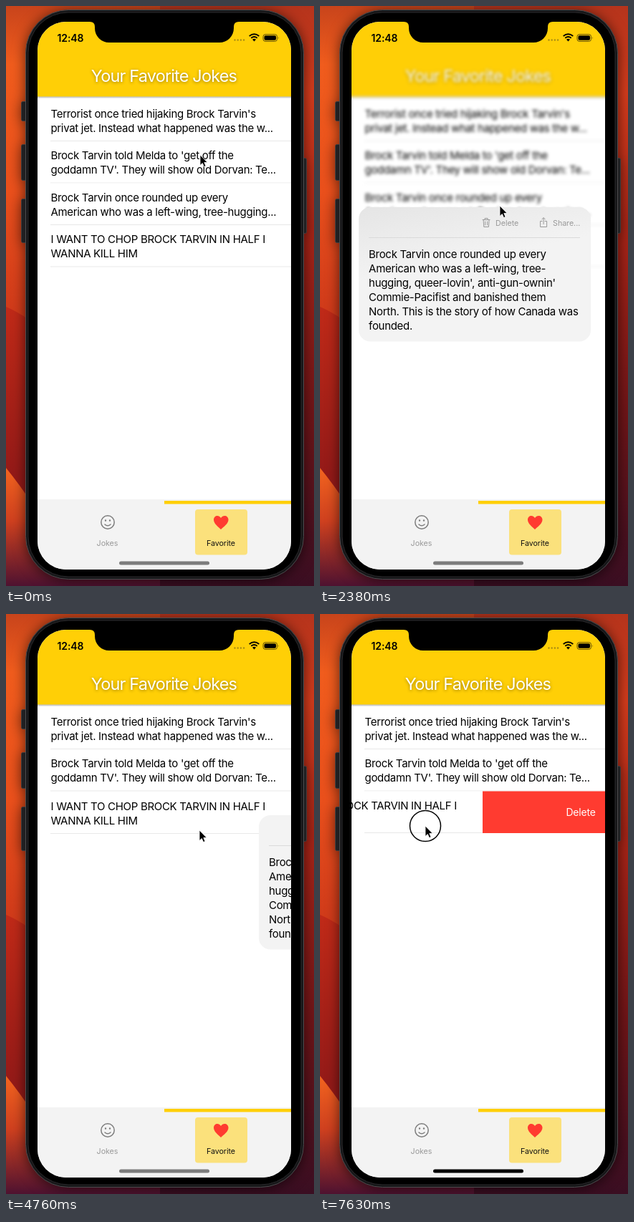
These frames come from a looping animation (430 by 810 pixels, 8 s). An HTML page:

```html
<!DOCTYPE html>
<html lang="en">
<head>
<meta charset="utf-8">
<title>Favorite jokes</title>
<style>
  html, body { margin: 0; width: 100%; height: 100%; overflow: hidden; background: #000; }
  svg { display: block; width: 100%; height: 100%; }
  text { font: 15px Inter, sans-serif; letter-spacing: -.31px; font-optical-sizing: none; white-space: pre; }
  .title { font-size: 23.5px; letter-spacing: -.83px; fill: #fff; filter: drop-shadow(0 1px 2px rgba(0,0,0,.4)); }
  .clock { font-size: 14px; font-weight: 600; letter-spacing: -.1px; }
  .small { font-size: 10.7px; letter-spacing: -.05px; }
  .swipe { font-size: 14px; letter-spacing: -.2px; fill: #fff; }
  .mid { text-anchor: middle; }
  .icon { fill: none; stroke: #999; stroke-linecap: round; stroke-linejoin: round; }
  #phone { filter: drop-shadow(0 2px 9px rgba(0,0,0,.6)); }
</style>
</head>
<body>
<svg viewBox="0 0 430 810">
  <defs>
    <clipPath id="screen"><rect x="44" y="22" width="354" height="765" rx="40"/></clipPath>
    <linearGradient id="leftWall" x2="0" y2="1">
      <stop offset="0" stop-color="#c8441b"/><stop offset=".1" stop-color="#f05c1d"/>
      <stop offset=".32" stop-color="#ea501c"/><stop offset=".53" stop-color="#cf3a1a"/>
    </linearGradient>
    <linearGradient id="lowWall" x2="0" y2="1">
      <stop offset="0" stop-color="#c02a18"/><stop offset=".6" stop-color="#941a18"/>
    </linearGradient>
    <linearGradient id="rightWall" x2="0" y2="1">
      <stop offset="0" stop-color="#b5341c"/><stop offset=".15" stop-color="#d53c1c"/>
      <stop offset=".4" stop-color="#a82417"/><stop offset=".7" stop-color="#701518"/>
      <stop offset="1" stop-color="#3a0e22"/>
    </linearGradient>
    <linearGradient id="dusk" x2="0" y2="1">
      <stop offset="0" stop-color="#f2641f"/><stop offset=".45" stop-color="#cf401f"/>
      <stop offset="1" stop-color="#4e1230"/>
    </linearGradient>
    <linearGradient id="edge" x2="0" y2="1">
      <stop offset="0" stop-opacity=".28"/><stop offset="1" stop-opacity="0"/>
    </linearGradient>
    <linearGradient id="glass" x2=".35" y2="1">
      <stop offset="0" stop-color="#e5e5e5"/><stop offset=".5" stop-color="#f3f3f3"/>
    </linearGradient>
  </defs>

  <g id="wallpaper">
    <rect width="430" height="810" fill="url(#rightWall)"/>
    <rect width="215" height="810" fill="url(#leftWall)"/>
    <path d="M0 420Q16 427 32 438H215V810H0Z" fill="url(#lowWall)"/>
    <path d="M0 645Q18 667 40 700H215V810H0Z" fill="url(#dusk)"/>
  </g>

  <g id="phone">
    <g fill="#202022" stroke="#3c3c3e">
      <rect x="21.500" y="133.500" width="8" height="27" rx="2"/>
      <rect x="21.500" y="193.500" width="8" height="50" rx="2"/>
      <rect x="21.500" y="269.500" width="8" height="61" rx="2"/>
      <rect x="411.500" y="212.500" width="8" height="105" rx="2"/>
    </g>
    <rect x="27.500" y="5.500" width="388" height="795" rx="60" fill="#161618" stroke="#4c4c4e"/>
    <rect x="31" y="9" width="381" height="788" rx="56" stroke="#2a2a2c"/>
  </g>

  <g clip-path="url(#screen)">
    <rect x="44" y="22" width="354" height="765" fill="#fff"/>
    <g id="page">
      <g id="rows"></g>
      <rect x="24" y="0" width="394" height="126.500" fill="#ffcf06"/>
      <rect x="24" y="126.500" width="394" height="3" fill="url(#edge)"/>
      <text class="title mid" x="220.500" y="106">Your Favorite Jokes</text>
    </g>

    <g id="tabs">
      <rect x="44" y="689" width="354" height="98" fill="#f3f3f3"/>
      <rect x="221" y="691" width="177" height="4.500" fill="#ffcf06"/>
      <rect x="264" y="703" width="73" height="63.500" rx="4" fill="#fbe17c"/>
      <path d="M300 731C296 727 290 723 290 717.500C290 711.500 297 710 300 715C303 710 310.500 711.500 310.500 717.500C310.500 723 304 727 300 731Z" fill="#ff3b30"/>
      <g class="icon" style="stroke:#7d7d7d" stroke-width="1.500">
        <circle cx="142" cy="721" r="9.200"/>
        <path d="M138 724Q142 727.500 146 724"/>
        <path d="M139 718.500h0M145 718.500h0" stroke-width="2.400"/>
      </g>
      <text class="small mid" x="141.500" y="754" fill="#999">Jokes</text>
      <text class="small mid" x="300" y="754" fill="#111">Favorite</text>
    </g>

    <g id="card">
      <rect id="panel" x="59" y="281" width="324" height="187.500" rx="16"/>
      <path d="M73 323.500H368" stroke="#dadada"/>
      <g class="icon">
        <path d="M232 298.500H242M235 298.500V296.500H239V298.500M233 298.500L233.700 308.500H240.300L241 298.500M235.500 301V306M238.500 301V306"/>
        <path d="M315 300.500H312.500V308.500H321.500V300.500H319M317 304.500V296M314.700 298L317 295.700L319.300 298"/>
      </g>
      <text class="small" x="250" y="306.500" fill="#999">Delete</text>
      <text class="small" x="330" y="306.500" fill="#999">Share...</text>
    </g>

    <rect id="home" x="158" y="775.500" width="126" height="5" rx="2.500"/>
  </g>

  <g id="status">
    <path d="M117 21h208v1q-7 0-7 7v2a20 20 0 0 1-20 20h-154a20 20 0 0 1-20-20v-2q0-7-7-7z"/>
    <text class="clock" x="71.500" y="50">12:48</text>
    <path d="M319.500 47.500H334" stroke="#a88b14" stroke-width="2.400" stroke-dasharray="0 4.200" stroke-linecap="round"/>
    <path d="M346.500 49.500L344 46.700Q346.500 44.800 349 46.700Z"/>
    <path d="M342.300 44.700Q346.500 41.300 350.700 44.700M339.700 42Q346.500 36.600 353.300 42" fill="none" stroke="#000" stroke-width="1.900"/>
    <rect x="359" y="39.700" width="19.500" height="9.600" rx="3" fill="none" stroke="#5f4e08"/>
    <rect x="360.500" y="41.200" width="16.500" height="6.600" rx="1.700"/>
    <path d="M380 43v3.200q1.400-1.600 0-3.200z" fill="#5f4e08"/>
  </g>

  <g id="pointer">
    <circle id="press" r="21.500" fill="none" stroke="#000" stroke-width="1.500"/>
    <path d="M0 0V14.500L3.300 11.500L5.600 16.600L8 15.500L5.800 10.500H10.200Z" stroke="#fff" stroke-width=".8"/>
  </g>
</svg>

<script>
const LOOP = 8000, STEP = 70, ROW = 58.5, LIST_TOP = 130.5;
const $ = id => document.getElementById(id);

const jokes = [
  ["Terrorist once tried hijaking Brock Tarvin's", "privat jet. Instead what happened was the w..."],
  ["Brock Tarvin told Melda to 'get off the", "goddamn TV'. They will show old Dorvan: Te..."],
  ["Brock Tarvin once rounded up every", "American who was a left-wing, tree-hugging..."],
  ["I WANT TO CHOP BROCK TARVIN IN HALF I", "WANNA KILL HIM"]
];
const cardLines = [
  "Brock Tarvin once rounded up every",
  "American who was a left-wing, tree-",
  "hugging, queer-lovin', anti-gun-ownin'",
  "Commie-Pacifist and banished them",
  "North. This is the story of how Canada was",
  "founded."
];

function add(parent, tag, attrs, content) {
  const node = document.createElementNS("http://www.w3.org/2000/svg", tag);
  for (const name in attrs) node.setAttribute(name, attrs[name]);
  if (content) node.textContent = content;
  return parent.appendChild(node);
}

const rows = jokes.map(lines => {
  const group = add($("rows"), "g", {});
  add(group, "rect", { x: 44, width: 354, height: ROW, fill: "#fff" });
  const label = add(group, "g", {});
  lines.forEach((line, i) => add(label, "text", { x: 62.5, y: 25 + 20 * i }, line));
  add(group, "path", { d: "M62 58H398", stroke: "#e8e8e8" });
  return { group, label };
});
cardLines.forEach((line, i) => add($("card"), "text", { x: 73, y: 351.5 + 20 * i }, line));

const swiped = rows[3];
const redBox = add(swiped.group, "rect", { y: 0, height: ROW, fill: "#ff3b30" });
const redLabel = add(swiped.group, "text", { class: "swipe mid", y: 34 }, "Delete");

// Pointer stops: time, x, y
const path = [
  [0, 271, 208], [840, 264, 240], [1050, 264, 240], [1820, 251, 279], [2520, 251, 279],
  [3010, 327, 305], [3360, 327, 303], [3780, 273, 303], [3990, 270, 302], [5670, 270, 302],
  [5810, 276, 302], [5950, 276, 302], [6090, 283, 301], [6160, 283, 301], [6300, 290, 300],
  [6370, 290, 300], [6510, 298, 298], [6580, 298, 298], [6860, 338, 290], [7000, 338, 296],
  [7070, 338, 296], [7630, 147, 296], [LOOP, 147, 296]
];

const progress = (t, start, end) => Math.min(1, Math.max(0, (t - start) / (end - start)));
const easeOut = p => 1 - (1 - p) ** 3;

// cubic-bezier(.25, .1, .25, 1)
function ease(p) {
  const bezier = (s, a, b) => 3 * a * s * (1 - s) ** 2 + 3 * b * s * s * (1 - s) + s ** 3;
  let low = 0, high = 1;
  for (let i = 0; i < 20; i++) {
    const mid = (low + high) / 2;
    if (bezier(mid, .25, .25) < p) low = mid; else high = mid;
  }
  return bezier(low, .1, 1);
}

function pointerAt(t) {
  const i = Math.max(1, path.findIndex(stop => stop[0] >= t));
  const [t0, x0, y0] = path[i - 1], [t1, x1, y1] = path[i];
  const p = progress(t, t0, t1);
  return [x0 + (x1 - x0) * p, y0 + (y1 - y0) * p];
}

const move = (node, x, y) => node.setAttribute("transform", `translate(${x} ${y})`);
const show = (node, visible) => node.style.display = visible ? "" : "none";

function draw(t) {
  const [x, y] = pointerAt(t);
  move($("pointer"), x, y);
  show($("press"), (t >= 1890 && t < 2030) || (t >= 4410 && t < 4550) || t >= 7070);

  const enter = ease(progress(t, 2126, 2426)), leave = ease(progress(t, 4601, 4901));
  show($("card"), enter > 0 && leave < 1);
  move($("card"), 354 * (enter - 1 + leave), 0);
  $("panel").setAttribute("fill", leave ? "#f3f3f3" : "url(#glass)");

  const blur = leave ? 0 : 2.4 * progress(t, 2180, 2430);
  $("page").style.filter = blur ? `blur(${blur}px)` : "none";
  $("home").setAttribute("fill", t < 4900 ? "#7c7c7c" : "#000");

  const removed = easeOut(progress(t, 4480, 4860));
  rows.forEach(({ group }, i) => move(group, 0, LIST_TOP + ROW * (i === 3 ? 3 - removed : i)));
  rows[2].group.style.opacity = 1 - removed;

  const reveal = t >= 7070 ? Math.max(0, 318 - x) : 0;
  move(swiped.label, -reveal, 0);
  redBox.setAttribute("x", 398 - reveal);
  redBox.setAttribute("width", reveal);
  redLabel.setAttribute("x", 364 + Math.max(0, 68 - reveal));
}

function tick(now) {
  draw(Math.floor(now % LOOP / STEP) * STEP);
  requestAnimationFrame(tick);
}
draw(0);
requestAnimationFrame(tick);
</script>
</body>
</html>
```
